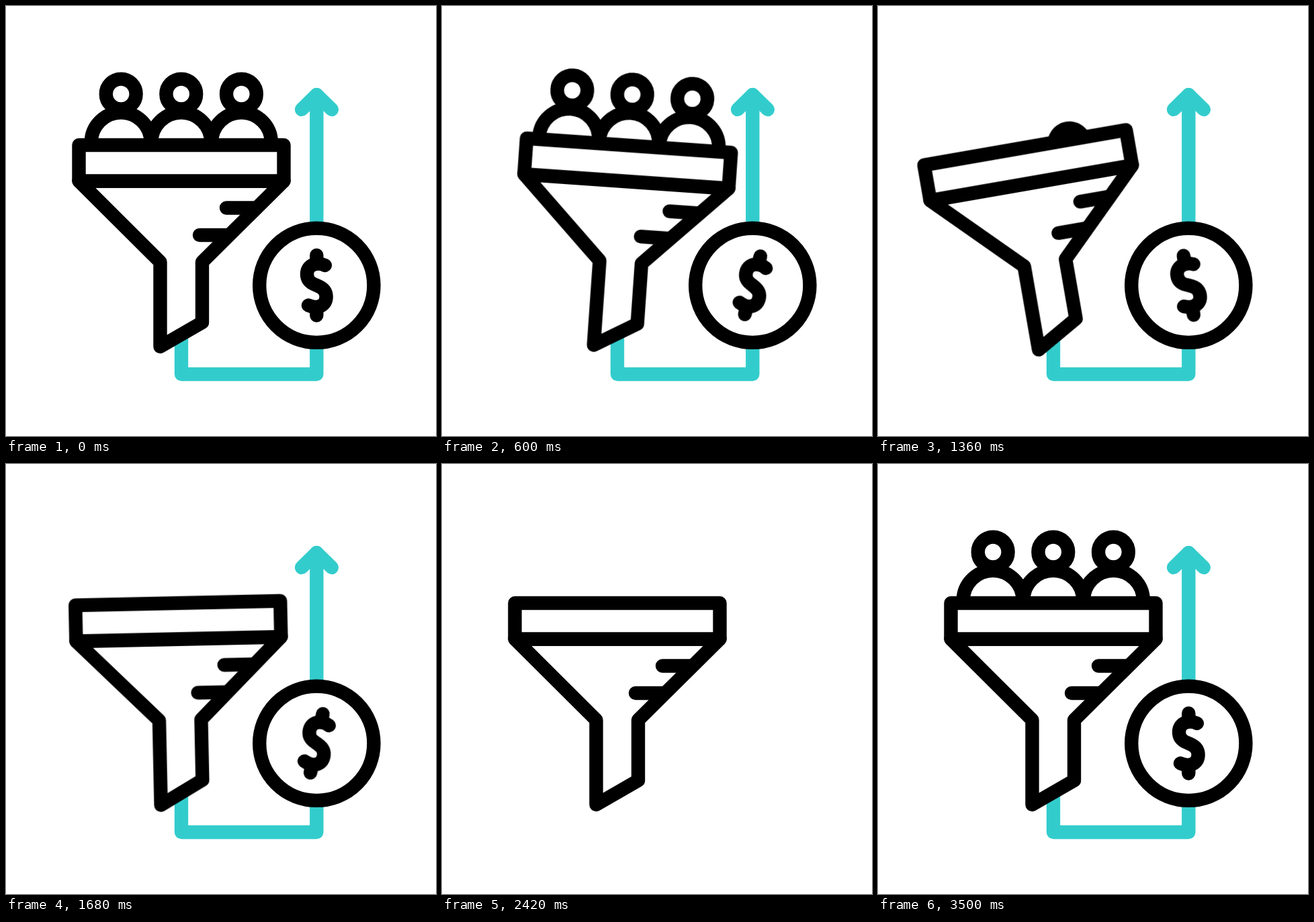
Write an HTML page without scripts that moves like this. It is 640 px wide and 640 px high and loops after 3620 ms.

```html
<!DOCTYPE html>
<html lang="en">
<head>
<meta charset="utf-8">
<title>Sales funnel</title>
<style>
  :root {
    --smooth: cubic-bezier(.333, 0, .667, 1);
    --sink: cubic-bezier(.333, 0, .667, .5);
    --rise: cubic-bezier(.333, .5, .667, 1);
    --speed-up: cubic-bezier(.333, 0, .667, .333);
    --slow-down: cubic-bezier(.333, .667, .667, 1);
  }
  html, body { margin: 0; width: 100%; height: 100%; overflow: hidden; background: #fff; }
  svg { display: block; width: 100vw; height: 100vh; }
  .ink, .arrow {
    fill: none; stroke: #000; stroke-width: 20.4;
    stroke-linecap: round; stroke-linejoin: round;
  }
  .arrow { stroke: #3cc; }
  .solid { fill: #fff; }

  .funnel, .person, .lift, .dollar, .trail, .head {
    animation: 3620ms var(--smooth) infinite;
  }
  .funnel { animation-name: tilt; transform-origin: 261px 453px; }
  .dollar { animation-name: rock; transform-origin: 462.3px 415.8px; }
  .lift { animation-name: lift; }
  .trail { animation-name: trail; stroke-dasharray: 947 1000; }
  .head { animation-name: head; stroke-dasharray: 32 100; }
  .left { animation-name: left; --down: translate(40px, 140px); }
  .middle { animation-name: middle; --down: translate(0, 140px); }
  .right { animation-name: right; --down: translate(-40px, 140px); }

  @keyframes tilt {
    0%, 49.724%, 100% { transform: rotate(0deg); }
    16.575% { transform: rotate(4deg); }
    33.149% { transform: rotate(-12deg); }
  }
  @keyframes rock {
    0%, 74.586%, 100% { transform: rotate(0deg); }
    16.575%, 49.724% { transform: rotate(15deg); }
    33.149%, 66.298% { transform: rotate(-15deg); }
  }
  @keyframes left {
    0%, 96.685%, 100% { transform: none; }
    21.133% { transform: none; animation-timing-function: var(--sink); }
    37.707% { transform: var(--down); }
    84.254% { transform: var(--down); animation-timing-function: var(--rise); }
  }
  @keyframes middle {
    0%, 87.017%, 100% { transform: none; }
    26.243% { transform: none; animation-timing-function: var(--sink); }
    42.818% { transform: var(--down); }
    74.586% { transform: var(--down); animation-timing-function: var(--rise); }
  }
  @keyframes right {
    0%, 77.348%, 100% { transform: none; }
    32.044% { transform: none; animation-timing-function: var(--sink); }
    48.619% { transform: var(--down); }
    64.917% { transform: var(--down); animation-timing-function: var(--rise); }
  }
  @keyframes lift {
    0%, 74.586%, 100% { transform: translateY(0); }
    58.011% { transform: translateY(0); animation-timing-function: var(--speed-up); }
    68.508% { transform: translateY(-571px); }
    69.061% { transform: translateY(-530px); animation-timing-function: var(--slow-down); }
  }
  @keyframes trail {
    0%, 41.436% { stroke-dashoffset: 0; }
    58.011%, 68.6% { stroke-dashoffset: -663; }
    68.61%, 80.11% { stroke-dashoffset: 960; }
    96.685%, 100% { stroke-dashoffset: 0; }
  }
  @keyframes head {
    0%, 68.6% { stroke-dashoffset: 0; }
    68.61%, 93.37% { stroke-dashoffset: 45; }
    96.685%, 100% { stroke-dashoffset: 0; }
  }
</style>
</head>
<body>
<svg viewBox="0 0 640 640">
  <defs>
    <g id="person">
      <circle cy="131" r="22.4"/>
      <path d="M-44.4 203a44.4 44.4 0 0 1 88.8 0"/>
    </g>
    <clipPath id="above-rim"><rect x="0" y="-100" width="640" height="307"/></clipPath>
  </defs>

  <g class="arrow lift">
    <path class="trail" d="M261 218V548H462.3V132"/>
    <path class="head" d="M462.3 132L440 154M462.3 132L484.8 154"/>
  </g>

  <g class="ink funnel">
    <g clip-path="url(#above-rim)">
      <g class="person left"><use href="#person" x="171.2"/></g>
      <g class="person middle"><use href="#person" x="260.8"/></g>
      <g class="person right"><use href="#person" x="350.4"/></g>
    </g>
    <path class="solid" d="M108.5 260.5L229.5 381V507L292 471V381L413.5 260.5Z"/>
    <path class="solid" d="M108.5 207H413.5V260.5H108.5Z"/>
    <path d="M328 300.5H371M288 341H331"/>
  </g>

  <g class="ink lift">
    <circle class="solid" cx="462.3" cy="415.8" r="85.1"/>
    <g class="dollar">
      <path d="M462.3 371V381M462.3 450V460.6"/>
      <path d="M474.8 386C464 381 448 384 448 399C448 412 459 414 462.3 415.8S476.6 420 476.6 433C476.6 448 460.6 450.6 450 445.6"/>
    </g>
  </g>
</svg>
</body>
</html>
```
